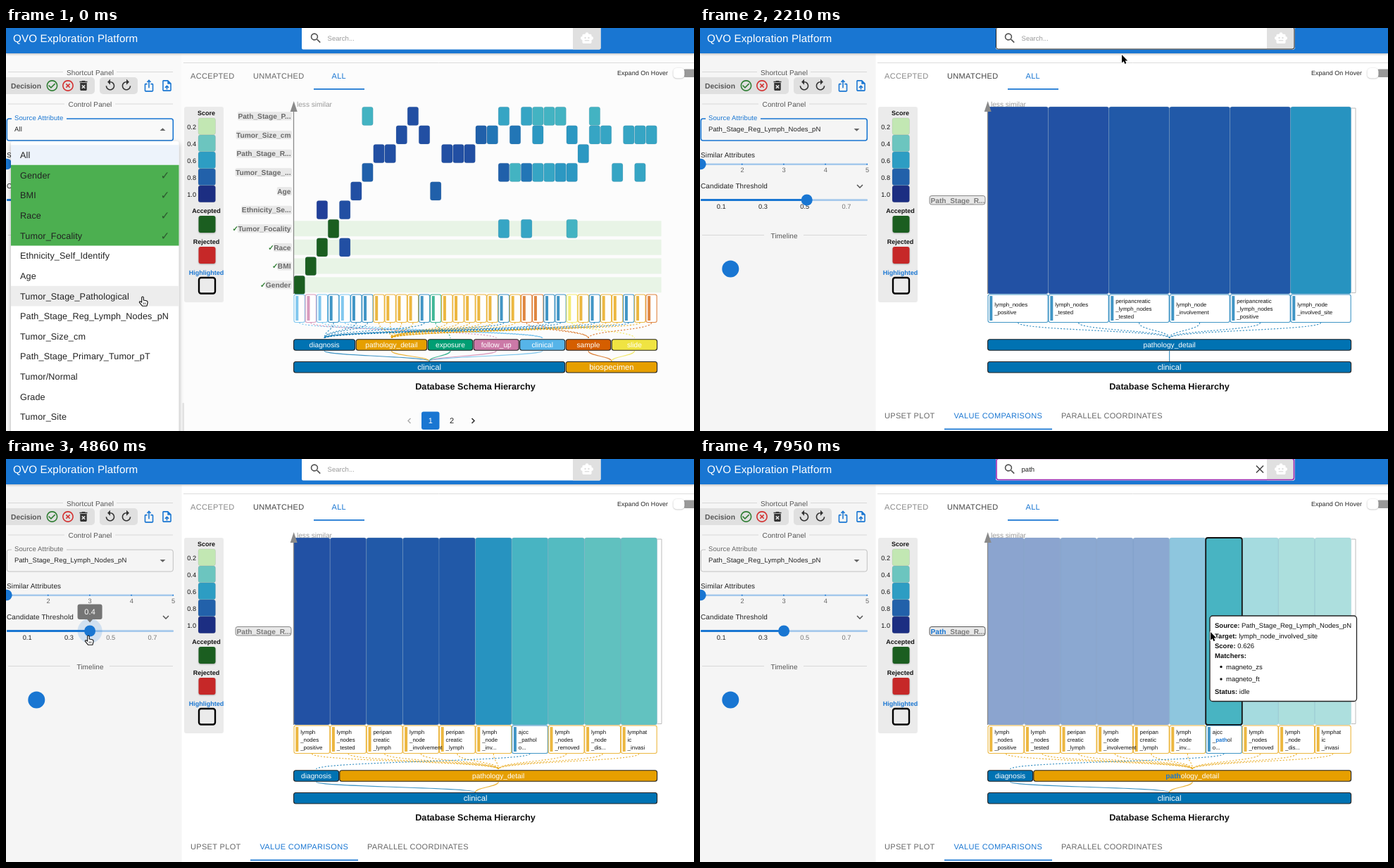
An HTML page with a canvas for the animation above (8 s loop, 977 by 573 pixels).

```html
<!DOCTYPE html>
<html lang="en">
<head>
<meta charset="utf-8">
<title>Schema matching</title>
<style>
  html, body { margin: 0; width: 100%; height: 100%; overflow: hidden; background: #fff; }
  canvas { display: block; }
</style>
</head>
<body>
<canvas id="stage" width="977" height="573"></canvas>
<script>
const ctx = document.getElementById('stage').getContext('2d');
const LOOP = 8000, BLUE = '#1976d2', LEFT = 408.6, WIDTH = 516, TOP = 112, HEIGHT = 266;

const circle24 = 'M12 2C6.48 2 2 6.48 2 12s4.48 10 10 10 10-4.48 10-10S17.52 2 12 2zm0 18c-4.42 0-8-3.58-8-8s3.58-8 8-8 8 3.58 8 8-3.58 8-8 8z';
const icons = {
  accept: circle24 + 'M16.59 7.58 10 14.17l-3.59-3.58L5 12l5 5 8-8z',
  reject: circle24 + 'M14.59 8 12 10.59 9.41 8 8 9.41 10.59 12 8 14.59 9.41 16 12 13.41 14.59 16 16 14.59 13.41 12 16 9.41z',
  trash: 'M6 19c0 1.1.9 2 2 2h8c1.1 0 2-.9 2-2V7H6zM8.5 11.9l1.4-1.4 2.1 2.1 2.1-2.1 1.4 1.4-2.1 2.1 2.1 2.1-1.4 1.4-2.1-2.1-2.1 2.1-1.4-1.4 2.1-2.1zM15.5 4l-1-1h-5l-1 1H5v2h14V4z',
  undo: 'M12 5V1L7 6l5 5V7c3.3 0 6 2.7 6 6s-2.7 6-6 6-6-2.7-6-6H4c0 4.4 3.6 8 8 8s8-3.6 8-8-3.6-8-8-8z',
  share: 'M16 5l-1.4 1.4-1.6-1.6V16h-2V4.8L9.4 6.4 8 5l4-4zM20 10v11c0 1.1-.9 2-2 2H6c-1.1 0-2-.9-2-2V10c0-1.1.9-2 2-2h3v2H6v11h12V10h-3V8h3c1.1 0 2 .9 2 2z',
  upload: 'M14 2H6c-1.1 0-2 .9-2 2v16c0 1.1.9 2 2 2h12c1.1 0 2-.9 2-2V8zM18 20H6V4h7v5h5zM8 15l1.4 1.4 1.6-1.6V19h2v-4.2l1.6 1.6L16 15l-4-4z',
  search: 'M15.5 14h-.8l-.3-.3A6.5 6.5 0 1 0 13.7 14.4l.3.3v.8l5 5 1.5-1.5zM9.5 14a4.5 4.5 0 1 1 0-9 4.5 4.5 0 0 1 0 9z',
  robot: 'M20 9V7c0-1.1-.9-2-2-2h-3a3 3 0 0 0-6 0H6c-1.1 0-2 .9-2 2v2a3 3 0 0 0 0 6v4c0 1.1.9 2 2 2h12c1.1 0 2-.9 2-2v-4a3 3 0 0 0 0-6zM7.5 11.5a1.5 1.5 0 1 1 3 0 1.5 1.5 0 0 1-3 0zM16 17H8v-2h8zM13.5 11.5a1.5 1.5 0 1 1 3 0 1.5 1.5 0 0 1-3 0z',
  close: 'M19 6.4 17.6 5 12 10.6 6.4 5 5 6.4 10.6 12 5 17.6 6.4 19 12 13.4 17.6 19 19 17.6 13.4 12z',
  drop: 'M7 10l5 5 5-5z',
  more: 'M16.6 8.6 12 13.2 7.4 8.6 6 10l6 6 6-6z'
};
for (const name in icons) icons[name] = new Path2D(icons[name]);
const handShape = new Path2D('M-1.3 1Q0-1 1.3 1V5L5.4 5.8Q7.4 6.3 7.1 8.5L6 13.2H-.5L-4.6 8.2Q-4.6 6-2.6 7L-1.3 8.2Z');
const arrowShape = new Path2D('M0 0V11.5L2.7 9.2 4.4 13 6.4 12.1 4.7 8.4H8.2Z');

// Drawing helpers
function box(x, y, w, h, r, fill, stroke, lineWidth = 1) {
  ctx.beginPath();
  ctx.roundRect(x, y, w, h, r);
  if (fill) { ctx.fillStyle = fill; ctx.fill(); }
  if (stroke) { ctx.strokeStyle = stroke; ctx.lineWidth = lineWidth; ctx.stroke(); }
}
function disc(x, y, r, fill) { box(x - r, y - r, 2 * r, 2 * r, r, fill); }
function line(color, lineWidth, ...points) {
  ctx.beginPath();
  points.forEach(p => ctx.lineTo(...p));
  ctx.strokeStyle = color;
  ctx.lineWidth = lineWidth;
  ctx.stroke();
}
function setFont(size, bold, spacing = 0) {
  ctx.font = `${bold ? 'bold ' : ''}${size}px "Liberation Sans", Arial, sans-serif`;
  ctx.textRendering = 'geometricPrecision';
  ctx.letterSpacing = spacing + 'px';
}
// y is the visual middle of the line
function text(str, x, y, size, color, { align = 'left', bold = false, spacing = 0 } = {}) {
  setFont(size, bold, spacing);
  ctx.textAlign = align;
  ctx.fillStyle = color;
  ctx.fillText(str, x, y + size * 0.36);
}
// Text with the searched part in bold blue
function found(str, x, y, size, color, query, { align = 'left', bold = false } = {}) {
  const at = query ? str.toLowerCase().indexOf(query) : -1;
  if (at < 0) return text(str, x, y, size, color, { align, bold });
  const end = at + query.length;
  const parts = [[str.slice(0, at), bold, color], [str.slice(at, end), true, BLUE], [str.slice(end), bold, color]]
    .map(([s, b, c]) => { setFont(size, b); return [s, b, c, ctx.measureText(s).width]; });
  const total = parts.reduce((sum, p) => sum + p[3], 0);
  x -= align === 'center' ? total / 2 : align === 'right' ? total : 0;
  for (const [s, b, c, w] of parts) { text(s, x, y, size, c, { bold: b }); x += w; }
}
function icon(name, x, y, color, scale = 0.79, flip = 1, turn = 1) {
  ctx.save();
  ctx.translate(x, y);
  ctx.scale(scale * flip, scale * turn);
  ctx.translate(-12, -12);
  ctx.fillStyle = color;
  ctx.fill(icons[name], 'evenodd');
  ctx.restore();
}
function link(x1, y1, x2, y2, color, dash) {
  const mid = (y1 + y2) / 2;
  ctx.beginPath();
  ctx.moveTo(x1, y1);
  ctx.bezierCurveTo(x1, mid, x2, mid, x2, y2);
  ctx.setLineDash(dash);
  ctx.strokeStyle = color;
  ctx.lineWidth = 1.2;
  ctx.stroke();
  ctx.setLineDash([]);
}
function shadow(blur, dy, draw) {
  ctx.save();
  ctx.shadowColor = 'rgba(0,0,0,.3)';
  ctx.shadowBlur = blur;
  ctx.shadowOffsetY = dy;
  draw();
  ctx.restore();
}

// Data
const scores = { a: '#224fa3', b: '#2060aa', c: '#2276b6', d: '#2c98c2', e: '#36a5c4', f: '#43b3c2', n: '#213f99', G: '#1b5e20' };
const rows = [
  ['Path_Stage_P...', '......f...a.......e.efff..f.....'],
  ['Tumor_Size_cm', '.........a.a....bc.c.d..d.ee.eee'],
  ['Path_Stage_R...', '.......aa....aaa.........d......'],
  ['Tumor_Stage_...', '......b...........bfceedd...e.e.'],
  ['Age', '.....a......b...................'],
  ['Ethnicity_Se...', '..n.a...........................'],
  ['Tumor_Focality', '...G..............e.e...f.......'],
  ['Race', '..G.a...........................'],
  ['BMI', '.G..............................'],
  ['Gender', 'G...............................']
];
const clinicalOnly = [['clinical', LEFT, WIDTH, '#0072b2']];
const layouts = {
  overview: {
    leaves: [...'cpcdcddoooodgooooodossddyodoodos'].map(parent => ({ parent, lines: [] })),
    parents: {
      d: ['diagnosis', LEFT, 87, '#0072b2'], o: ['pathology_detail', 497.2, 100.5, '#e69f00'],
      g: ['exposure', 599.2, 63.5, '#009e73'], p: ['follow_up', 664.2, 64, '#cc79a7'],
      c: ['clinical', 729.7, 64, '#56b4e9'], s: ['sample', 795.2, 63.5, '#d55e00'], y: ['slide', 860.2, 64.4, '#f0e442']
    },
    roots: [['clinical', LEFT, 385, '#0072b2'], ['biospecimen', 795.2, 129.4, '#e69f00']]
  },
  six: {
    leaves: ['lymph_nodes _positive', 'lymph_nodes _tested', 'peripancreatic _lymph_nodes _tested',
      'lymph_node _involvement', 'peripancreatic _lymph_nodes _positive', 'lymph_node _involved_site']
      .map(s => ({ parent: 'o', lines: s.split(' ') })),
    parents: { o: ['pathology_detail', LEFT, WIDTH, '#0072b2'] },
    roots: clinicalOnly
  },
  ten: {
    leaves: ['lymph _nodes _positive', 'lymph _nodes _tested', 'peripan creatic _lymph', 'lymph _node _involvement',
      'peripan creatic _lymph', 'lymph _node _inv...', 'ajcc _pathol o...', 'lymph _nodes _removed', 'lymph _node _dis...', 'lymphat ic _invasi']
      .map((s, i) => ({ parent: i === 6 ? 'd' : 'o', lines: s.split(' ') })),
    parents: { d: ['diagnosis', LEFT, 64, '#0072b2'], o: ['pathology_detail', 473.8, 450.8, '#e69f00'] },
    roots: clinicalOnly
  }
};
layouts.eight = { ...layouts.ten, leaves: layouts.ten.leaves.slice(0, 8) };
const barColors = ['#2251a4', '#2251a4', '#2159a8', '#2159a8', '#2159a8', '#2793c0', '#48b4c2', '#54bbc1', '#60c1bf', '#62c2c0'];
const menu = ['All', 'Gender', 'BMI', 'Race', 'Tumor_Focality', 'Ethnicity_Self_Identify', 'Age', 'Tumor_Stage_Pathological',
  'Path_Stage_Reg_Lymph_Nodes_pN', 'Tumor_Size_cm', 'Path_Stage_Primary_Tumor_pT', 'Tumor/Normal', 'Grade', 'Tumor_Site'];

// Motion: time, x, y
const route = [[0, 194, 382], [89, 194, 382], [90, 196, 385], [540, 196, 385], [1160, 203, 410], [1790, 203, 410],
  [2190, 599, 38], [2430, 599, 38], [3270, 148, 250], [3360, 149.7, 250], [3540, 149.7, 250], [3630, 143.4, 250],
  [4070, 125.5, 251], [4240, 125.5, 251], [4500, 117, 251], [4860, 117, 251], [5650, 530, 17], [5740, 531, 18],
  [7610, 531, 18], [7780, 584, 88], [7950, 725, 246], [LOOP, 725, 246]];
function pointer(t) {
  const i = route.findIndex((p, k) => k && t <= p[0]);
  const [t0, x0, y0] = route[i - 1], [t1, x1, y1] = route[i];
  let k = (t - t0) / (t1 - t0);
  k = k * k * (3 - 2 * k);
  return [x0 + (x1 - x0) * k, y0 + (y1 - y0) * k];
}

function drawHeader(t, query) {
  shadow(3, 1, () => box(0, -5, 977, 41, 0, BLUE));
  text('QVO Exploration Platform', 10, 14.5, 15.2, '#fff', { spacing: 0.11 });
  box(420, -4, 424.5, 34.5, 2, '#fff');
  box(805, -4, 39.5, 34.5, [0, 0, 2, 0], '#e0e0e0');
  icon('robot', 825, 14.5, '#fff', 0.82);
  icon('search', 440, 14.5, '#555', 0.8);
  text(query || 'Search...', 456.5, 14.5, 9.5, query ? '#222' : '#9a9a9a', { spacing: 0.05 });
  if (query) icon('close', 795, 14.5, '#444', 0.8);
  if (t > 2080 && t < 2300) box(420.5, -1, 423.5, 31, 3, null, '#222');
  if (t > 5600) box(421, -.5, 422.5, 30, 3, null, '#9c27b0', 1.6);
  const caret = (t > 5650 && t < 6270) || (t >= 6540 && t < 7430);
  if (caret) {
    setFont(9.5, false, 0.05);
    box(457 + ctx.measureText(query).width, 9, 1, 11, 0, '#222');
  }
}

function divider(label, y, half) {
  text(label, 119.5, y, 10, '#555', { align: 'center', spacing: 0.1 });
  line('#d8d8d8', 1, [3, y - .5], [119 - half, y - .5]);
  line('#d8d8d8', 1, [119 + half, y - .5], [237, y - .5]);
}

function drawPanel(t, x) {
  const open = t < 1790, focused = t < 3540, paper = open ? '#f9f9f9' : '#f5f5f5';
  box(0, 37, 249.5, 536, 0, paper);
  divider('Shortcut Panel', 63, 38);
  box(-4, 70, 130, 24, 5, '#e0e0e0');
  box(133, 70, 54, 24, 5, '#e0e0e0');
  text('Decision', 7, 82, 10.3, '#555', { bold: true });
  icon('accept', 65.5, 82, '#2e7d32');
  icon('reject', 88, 82, '#d32f2f');
  icon('trash', 110, 82, '#333');
  icon('undo', 148, 81.5, '#333');
  icon('undo', 171, 81.5, '#333', 0.79, -1);
  icon('share', 203, 82, BLUE);
  icon('upload', 228.5, 82, BLUE);
  divider('Control Panel', 108.5, 36);

  box(1.3, 129, 236, 31, 3, null, focused ? BLUE : '#c0c0c0', focused ? 1.6 : 1);
  box(8, 127, 78, 4, 0, paper);
  text('Source Attribute', 12, 128, 9.5, focused ? BLUE : '#666', { spacing: 0.12 });
  text(open ? 'All' : menu[8], 12, 144, 9.5, '#222', { spacing: 0.12 });
  icon('drop', 222.5, 144.5, '#666', 0.79, 1, open ? -1 : 1);

  text('Similar Attributes', 1, 180.5, 10, '#222', { spacing: 0.12 });
  box(1, 192.5, 237, 2.6, 1, '#a5c9ec');
  for (let i = 1; i < 5; i++) {
    disc(.5 + i * 59.2, 193.7, .9, BLUE);
    text(i + 1, .8 + i * 59.2, 202, 9.3, '#666', { align: 'center' });
  }
  disc(1, 193.5, 7.7, BLUE);

  const value = t < 3540 ? 0.51 : t < 4500 ? (x + 1.6) / 296.5 : 0.4;
  const thumb = .5 + value * 296.5, hover = t > 3250 && t < 4950;
  text('Candidate Threshold', 1, 224.5, 10, '#222', { spacing: 0.12 });
  icon('more', 227, 225, '#555', 0.75);
  box(1, 243.3, 237, 2.6, 1, '#a5c9ec');
  box(1, 243.1, thumb, 3, 1, BLUE);
  for (const v of [0.1, 0.3, 0.5, 0.7])
    text(v, .5 + v * 296.5, 253.5, 9.3, v <= value ? '#222' : '#777', { align: 'center' });
  if (hover) disc(thumb, 244.5, 17.5, 'rgba(25,118,210,.17)');
  disc(thumb, 244.5, 8, BLUE);
  if (hover) {
    const label = String(+value.toFixed(2)), half = label.length > 3 ? 20.5 : 17.5;
    box(thumb - half, 206.5, half * 2, 21.5, 3, '#757575');
    ctx.beginPath();
    ctx.moveTo(thumb - 4, 228); ctx.lineTo(thumb + 4, 228); ctx.lineTo(thumb, 232.5);
    ctx.fill();
    text(label, thumb, 217.5, 11, '#fff', { align: 'center', spacing: 0.1 });
  }
  divider('Timeline', 295, 28);
  disc(43.3, 342.5, 12, BLUE);
}

function drawMenu(t, y) {
  if (t > 1970) return;
  ctx.save();
  ctx.globalAlpha = Math.min(1, (1970 - t) / 180);
  shadow(7, 3, () => box(7, 161, 238.5, 430, 3, '#fff'));
  const middle = i => 180.4 + i * 28.65;
  const band = (from, count, fill) => box(7, middle(from) - 14.2, 238.5, 28.65 * count, 0, fill);
  band(0, 1, '#edf3fb');
  band(1, 4, '#4caf50');
  band(y < 395 ? 7 : 8, 1, '#ededed');
  if (t > 1560) {
    ctx.save();
    ctx.clip(new Path2D('M7 395H245.5V424H7Z'));
    disc(204.5, 410, 9 + (t - 1560) * 0.08 * (1 + Math.max(0, t - 1620) / 30), 'rgba(0,0,0,.17)');
    ctx.restore();
  }
  menu.forEach((name, i) => {
    text(name, 20, middle(i), 12.65, '#222', { spacing: 0.12 });
    if (i > 0 && i < 5) text('✓', 226, middle(i), 15.5, '#2d5a30', { align: 'center' });
  });
  ctx.restore();
}

function drawLegend() {
  const label = (s, y, color = '#111') => text(s, 284.5, y, 9, color, { align: 'center', bold: true });
  box(253, 112, 56, 278, 3, '#ebebeb');
  label('Score', 121);
  ['#c2e7b3', '#6cc5bf', '#2d9dc3', '#2261aa', '#1c2e82'].forEach((color, i) => {
    box(273, 128 + i * 24, 24.5, 23.7, 3, color, 'rgba(120,120,120,.25)', .6);
    text((.2 + i * .2).toFixed(1), 270, 140.5 + i * 24, 9.2, '#111', { align: 'right' });
  });
  label('Accepted', 260);
  shadow(2, 1, () => box(273.5, 267, 24, 24, 3, '#1b5e20'));
  label('Rejected', 304);
  shadow(2, 1, () => box(273.5, 311, 24, 24, 3, '#c62828'));
  label('Highlighted', 347.5, BLUE);
  box(274, 355, 23, 22.5, 3, null, '#000', 2.4);
}

function drawHierarchy({ leaves, parents, roots }, query) {
  const step = WIDTH / leaves.length;
  const center = ([, x, w]) => x + w / 2;
  leaves.forEach(({ parent }, i) => {
    const x = LEFT + i * step, color = parents[parent][3];
    ctx.globalAlpha = 0.75;
    link(x + step / 2, 419, center(parents[parent]), 441, color, [2.2, 2.2]);
    box(x + .4, 379, step - .8, 39.5, 2.5, '#fff', color, 1.1);
    box(x + 2.7, 381, 4, 35, 0, color);
    ctx.globalAlpha = 1;
  });
  leaves.forEach(({ lines }, i) => lines.forEach((s, k) =>
    found(s, LEFT + i * step + 9.6, 399 + (k - (lines.length - 1) / 2) * 11, 7.9, '#111', query)));
  const bar = ([name, x, w, color], y, size) => {
    box(x, y, w, 15.5, 3, color, '#222', 1.1);
    found(name, x + w / 2, y + 7.8, size, '#fff', query, { align: 'center' });
  };
  Object.values(parents).forEach(p => {
    const mid = center(p), root = roots.find(([, x, w]) => mid < x + w);
    ctx.globalAlpha = 0.75;
    link(mid, 459, center(root), 474, p[3], []);
    ctx.globalAlpha = 1;
  });
  Object.values(parents).forEach(p => bar(p, 442.8, 10.2));
  roots.forEach(r => bar(r, 474.5, 11.3));
  text('Database Schema Hierarchy', 666.5, 509.5, 12.7, '#111', { align: 'center', bold: true });
}

function drawOverview() {
  const rowHeight = HEIGHT / 10 + .06, step = WIDTH / 32;
  rows.forEach(([name, cells], r) => {
    const y = TOP + r * rowHeight, mid = y + rowHeight / 2;
    if (r > 5) box(LEFT, y + 2.2, 522, 22, 0, '#e8f4e6');
    setFont(10.2, true);
    const w = ctx.measureText(name).width;
    box(404 - w, mid - 6, w + 2, 12, 2, '#e8e8e8');
    text(name, 404.5, mid, 10.2, '#6a6a6a', { align: 'right', bold: true });
    if (r > 5) text('✓', 405 - w, mid, 10.2, '#2e7d32', { align: 'right', bold: true });
    [...cells].forEach((c, i) => {
      if (scores[c]) box(LEFT + i * step + .3, y + .2, step - .6, rowHeight - .4, 3, scores[c], 'rgba(50,80,110,.25)', .5);
    });
  });
}

function drawBars({ leaves }, query) {
  const step = WIDTH / leaves.length;
  line('#bbb', 1, [925, 114], [931, 114], [931, 376.5], [925, 376.5]);
  leaves.forEach(({ lines }, i) => {
    ctx.globalAlpha = lines.join('').includes(query) ? 1 : 0.52;
    box(LEFT + i * step, TOP, step, HEIGHT, 3, barColors[i], 'rgba(130,160,190,.5)', .7);
    ctx.globalAlpha = 1;
  });
  if (query) leaves.forEach(({ lines }, i) => {
    if (lines.join('').includes(query)) box(LEFT + i * step, TOP, step, HEIGHT, 3, null, '#111', 1.8);
  });
  box(326, 238.5, 79, 12.5, 3, '#e8e8e8', query ? '#555' : '#888');
  found(rows[2][0], 404.5, 245, 10.2, '#7a7a7a', query, { align: 'right', bold: true });
}

function drawContent(t, query) {
  const overview = t < 1880;
  const layout = layouts[overview ? 'overview' : t < 3980 ? 'six' : t < 4330 ? 'eight' : 'ten'];
  const tab = (s, x, y, color) => text(s, x, y, 11, color, { spacing: 0.33 });
  if (overview) box(249.5, 37, 728, 536, 0, '#fcfcfc');
  line('#dcdcdc', 1, [252, 49.5], [977, 49.5]);
  tab('ACCEPTED', 262, 68.3, overview ? '#666' : '#888');
  tab('UNMATCHED', 351, 68.3, overview ? '#666' : '#444');
  tab('ALL', 462.5, 68.3, BLUE);
  box(437, 86, 72, 1.8, 0, BLUE);
  text('Expand On Hover', 868, 63.5, 8.9, '#222', { spacing: 0.1 });
  box(960, 58.5, 30, 11.5, 5, '#999');
  shadow(2, .5, () => box(947.5, 57, 16, 14.5, 5, '#fff'));

  drawLegend();
  text('less similar', 413, 108.5, 10.1, '#999');
  if (overview) drawOverview(); else drawBars(layout, query);
  line('#8a8a8a', 1.3, [408.5, 118], [408.5, 378]);
  ctx.fillStyle = '#8a8a8a';
  ctx.fill(new Path2D('M408.7 104L413.7 119H403.7Z'));
  drawHierarchy(layout, query);

  if (overview) {
    line('#aaa', 1.4, [574.5, 555], [571, 558.5], [574.5, 562]);
    box(590, 545.5, 25.5, 25.5, 3, BLUE);
    text('1', 602.8, 558, 11, '#fff', { align: 'center' });
    text('2', 633, 558, 11, '#222', { align: 'center' });
    line('#333', 1.6, [661.5, 555], [665, 558.5], [661.5, 562]);
    box(250.5, 533, 2.5, 40, 1, '#e4e4e4');
  } else {
    tab('UPSET PLOT', 262, 551.5, '#666');
    tab('VALUE COMPARISONS', 360.5, 551.5, BLUE);
    tab('PARALLEL COORDINATES', 513, 551.5, '#666');
    box(347, 569.5, 153, 1.8, 0, BLUE);
  }
}

function drawDetails() {
  box(724, 223, 208.5, 121.5, 4, '#fff', '#222', 1.3);
  const field = (key, value, y) => {
    text(key + ':', 731, y, 9.5, '#111', { bold: true });
    const w = ctx.measureText(key + ': ').width;
    text(value, 731 + w, y, 9.5, '#111');
  };
  field('Source', menu[8], 237);
  field('Target', 'lymph_node_involved_site', 251.3);
  field('Score', '0.626', 265.6);
  field('Matchers', '', 280);
  ['magneto_zs', 'magneto_ft'].forEach((s, i) => {
    disc(740, 295.5 + i * 17.5, 1.7, '#111');
    text(s, 747, 295.3 + i * 17.5, 9.5, '#111');
  });
  field('Status', 'idle', 330.3);
}

function drawPointer(t, x, y) {
  if (t >= 7610 && t < 7780) return;
  ctx.save();
  ctx.translate(x, y);
  ctx.lineJoin = 'round';
  if (t < 1850 || (t > 3200 && t < 4930)) {
    ctx.fillStyle = '#fff';
    ctx.fill(handShape);
    ctx.strokeStyle = '#111';
    ctx.lineWidth = 1.1;
    ctx.stroke(handShape);
    line('#111', .8, [1.3, 8.5], [1.3, 11]);
    line('#111', .8, [3.6, 8.5], [3.6, 11]);
  } else if (t > 4930 && y < 30) {
    line('#222', 1.1, [-2.5, -6], [0, -5], [2.5, -6]);
    line('#222', 1.1, [0, -5], [0, 5.5]);
    line('#222', 1.1, [-2.5, 6.5], [0, 5.5], [2.5, 6.5]);
    line('#222', 1.1, [-1.5, 2], [1.5, 2]);
  } else {
    ctx.strokeStyle = '#fff';
    ctx.lineWidth = 1.8;
    ctx.stroke(arrowShape);
    ctx.fillStyle = '#000';
    ctx.fill(arrowShape);
  }
  ctx.restore();
}

function draw(now) {
  const t = now % LOOP, [x, y] = pointer(t);
  const query = 'path'.slice(0, [6540, 6630, 6810, 6890].filter(key => t >= key).length);
  box(0, 0, 977, 573, 0, '#fff');
  drawPanel(t, x);
  drawContent(t, query);
  drawHeader(t, query);
  drawMenu(t, y);
  if (t >= 7940) drawDetails();
  drawPointer(t, x, y);
}

const start = performance.now();
(function tick() {
  draw(performance.now() - start);
  requestAnimationFrame(tick);
})();
</script>
</body>
</html>
```
